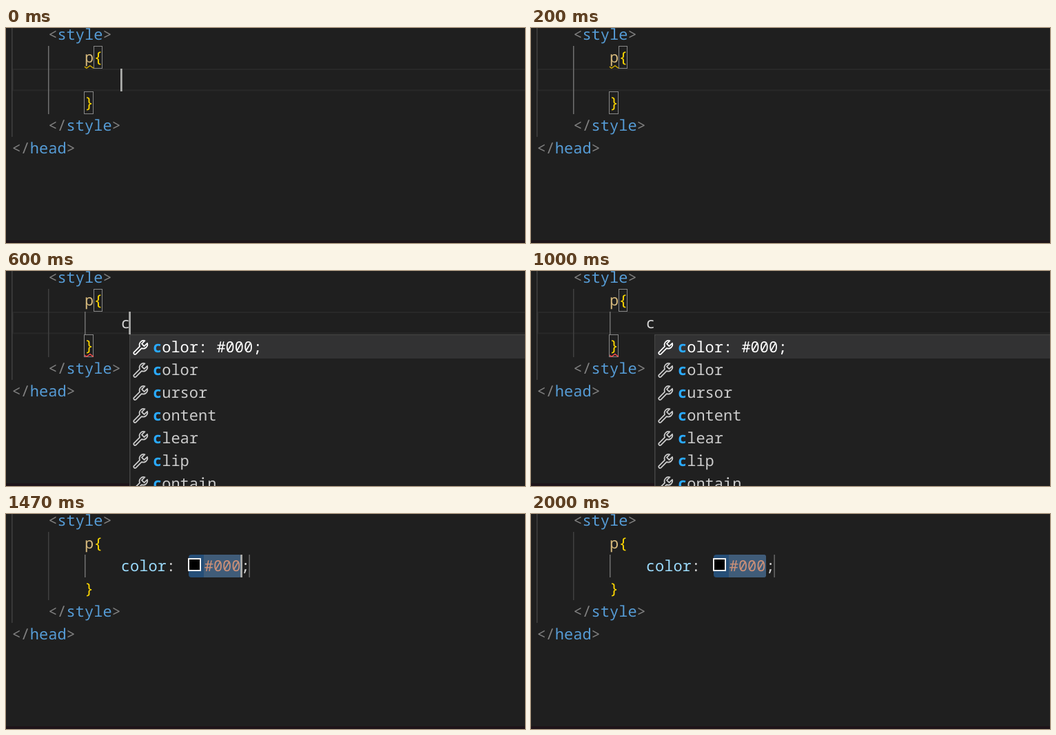
Animation of 753 by 312 pixels, one loop 2.33 s. Source, as an HTML page:

```html
<!DOCTYPE html>
<html lang="en">
<head>
<meta charset="utf-8">
<title>CSS completion</title>
<style>
html, body { margin: 0; height: 100%; overflow: hidden; background: #1f1f1f; }
svg { display: block; }
text { font: 22px "Noto Sans Mono", monospace; white-space: pre; text-rendering: geometricPrecision; fill: #d4d4d4; }
.tag { fill: #569cd6; }
.angle { fill: #808080; }
.sel { fill: #d7ba7d; }
.brace { fill: #ffd700; }
.prop { fill: #9cdcfe; }
.value { fill: #ce9178; }
.caret { fill: #aeafad; }
.dim { fill: #404040; }
.active { fill: #707070; }
.wave, .box, .icon { fill: none; }
.box { stroke: #888; }
.icon { stroke: #ccc; stroke-width: 1.1; stroke-linejoin: round; }
#menu text { fill: #ccc; }
#menu .match { fill: #2aaaff; font-weight: bold; }
#menu .picked, #menu .picked text { fill: #fff; }
#menu .picked .icon { fill: none; stroke: #fff; }
</style>
</head>
<body>
<svg width="753" height="312" viewBox="0 0 753 312">
  <defs>
    <path id="wrench" d="M11.9 1.9A3.8 3.8 0 0 0 7.3 7L1.9 12.4A1.25 1.25 0 0 0 3.6 14.1L9 8.7A3.8 3.8 0 0 0 14.1 4.1L11.3 6.9 9.1 4.7Z"/>
    <path id="wave" d="M0 2.1L2.9 4.3 7.9 .7 13 4.3"/>
  </defs>
  <rect width="753" height="312" fill="#1f1f1f"/>
  <rect y="308" width="753" height="4" fill="#1e1419"/>

  <!-- current line and indent guides -->
  <rect data-t="0-1200" x="10" y="60" width="760" height="30.5" fill="none" stroke="#282828" stroke-width="2"/>
  <rect class="dim" x="8" width="1.5" height="158"/>
  <rect data-t="0-460" class="active" x="61" y="26" width="1.5" height="99"/>
  <rect data-t="460-2330" class="dim" x="61" y="26" width="1.5" height="99"/>
  <rect data-t="460-2330" class="active" x="114" y="59" width="1.5" height="33"/>

  <!-- selections -->
  <rect data-t="1200-1470" x="259" y="59" width="53" height="33" rx="3" fill="#405c79"/>
  <g data-t="1470-2330">
    <rect x="265" y="59" width="76" height="33" rx="4" fill="#264f78"/>
    <path d="M287 59h51a3 3 0 0 1 3 3v27a3 3 0 0 1-3 3h-51z" fill="#405c79"/>
    <rect x="265" y="65" width="17" height="17" fill="#000" stroke="#eee" stroke-width="2"/>
  </g>

  <!-- bracket pair -->
  <g data-t="0-1280" class="box">
    <rect x="127.5" y="26.5" width="12" height="32"/>
    <rect x="113.5" y="92.5" width="13" height="32"/>
  </g>

  <!-- code -->
  <text x="61.2" y="17" class="tag"><tspan class="angle">&lt;</tspan>style<tspan class="angle">&gt;</tspan></text>
  <text x="114" y="50" class="sel">p<tspan class="brace">{</tspan></text>
  <text data-t="460-1200" x="166.8" y="83">c</text>
  <text data-t="1200-1280" x="166.8" y="83">color: #000;</text>
  <text data-t="1280-2330" x="166.8" y="83"><tspan class="prop">color</tspan>:</text>
  <text data-t="1280-1470" x="259.2" y="83"><tspan class="value">#000</tspan>;</text>
  <text data-t="1470-2330" x="287.7" y="83"><tspan class="value">#000</tspan>;</text>
  <text x="114" y="116" class="brace">}</text>
  <text x="61.2" y="149" class="tag"><tspan class="angle">&lt;/</tspan>style<tspan class="angle">&gt;</tspan></text>
  <text x="8.4" y="182" class="tag"><tspan class="angle">&lt;/</tspan>head<tspan class="angle">&gt;</tspan></text>

  <!-- squiggles -->
  <use data-t="0-460" href="#wave" class="wave" x="114" y="54" stroke="#cca700" stroke-width="1.5"/>
  <use data-t="460-1200" href="#wave" class="wave" x="114" y="120" stroke="#f14c4c" stroke-width="1.5"/>

  <!-- carets and snippet end mark -->
  <g class="caret">
    <rect data-t="0-200" x="166" y="59" width="2.7" height="33"/>
    <rect data-t="460-1000" x="178.2" y="59" width="2.7" height="33"/>
    <rect data-t="1200-1470" x="310.3" y="59" width="2.7" height="33"/>
    <rect data-t="1470-2000" x="340.2" y="59" width="2.7" height="33"/>
  </g>
  <rect data-t="1200-1470" x="324.3" y="59" width="1.7" height="33" fill="#606060"/>
  <rect data-t="1470-2330" x="352.3" y="59" width="1.7" height="33" fill="#606060"/>

  <g id="menu" data-t="600-1200">
    <rect x="179.75" y="92.75" width="600" height="240" fill="#202020" stroke="#454545" stroke-width="1.5"/>
    <rect x="181" y="94" width="572" height="33" fill="#323233"/>
  </g>
</svg>
<script>
const LOOP = 2330;
const words = ["color: #000;", "color", "cursor", "content", "clear", "clip", "contain"];

document.getElementById("menu").insertAdjacentHTML("beforeend", words.map((word, i) => `
  <g transform="translate(0 ${33 * i})" class="${i ? "" : "picked"}">
    <use href="#wrench" class="icon" transform="translate(182.4 98.2) scale(1.6)"/>
    <text x="213" y="118"><tspan class="match">${word[0]}</tspan>${word.slice(1)}</text>
  </g>`).join(""));

const parts = [...document.querySelectorAll("[data-t]")].map(node => {
  const [from, to] = node.dataset.t.split("-").map(Number);
  return { node, from, to };
});

let start;
function draw(now) {
  start ??= now;
  const t = (now - start) % LOOP;
  for (const { node, from, to } of parts)
    node.style.display = t >= from && t < to ? "" : "none";
  requestAnimationFrame(draw);
}
requestAnimationFrame(draw);
</script>
</body>
</html>
```
